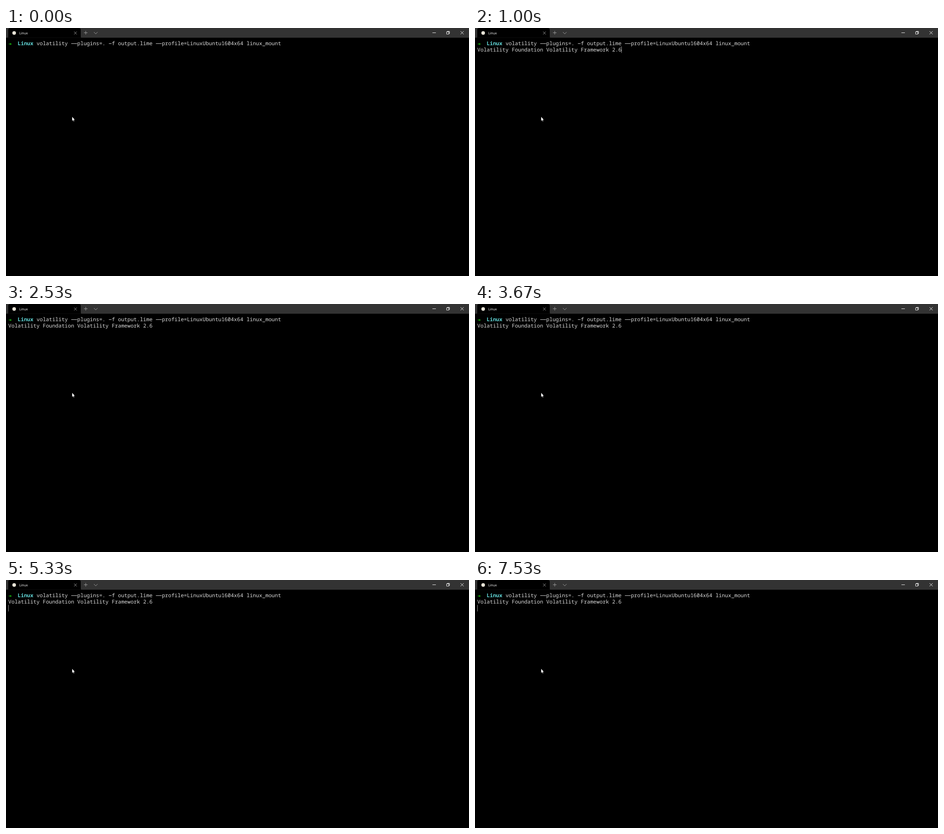
Write an HTML page that moves like this. It is 1022x548 px and loops after 8000 ms.

```html
<!DOCTYPE html>
<html lang="en">
<head>
<meta charset="utf-8">
<title>Terminal</title>
<style>
html, body { margin: 0; width: 100%; height: 100%; overflow: hidden; background: #000; }
svg { display: block; width: 1022px; height: 548px; }
text { text-rendering: geometricPrecision; white-space: pre; }
.term { font: 500 11.53px "Noto Sans Mono", "DejaVu Sans Mono", monospace; fill: #dadada; }
.term .dir { fill: #61d6d6; font-weight: 600; }
.rule { stroke: #cfcfcf; stroke-width: 1; }
.clear { fill: none; }
.tab { font: 500 7.6px "Open Sans", "Noto Sans", sans-serif; fill: #fff; }
.icon { fill: none; stroke: #fff; stroke-width: .9; }
.dim { stroke: #a8a8a8; }

#caret { fill: #989898; animation: move 8s step-end infinite, blink 8s step-end infinite; }
#output { animation: show 8s step-end infinite; }

@keyframes move {
  0% { transform: translate(607px, 26.4px); }
  10% { transform: translate(5px, 26.4px); }
  10.875% { transform: translate(5px, 40.75px); }
  12.5% { transform: translate(323px, 40.75px); }
  13.375%, 100% { transform: translate(5px, 55.1px); }
}
@keyframes blink {
  0%, 7.5%, 18.375%, 31.625%, 45.875%, 59.125%, 73.375%, 87.5% { opacity: 0; }
  .875%, 10%, 25%, 39.125%, 52.5%, 66.625%, 80%, 94.125%, 100% { opacity: 1; }
}
@keyframes show {
  0% { visibility: hidden; }
  12.5%, 100% { visibility: visible; }
}
</style>
</head>
<body>
<svg viewBox="0 0 1022 548">
  <rect width="1022" height="548"/>

  <!-- title bar -->
  <rect width="1022" height="21.5" fill="#333"/>
  <path d="M3 21.5Q5 21.5 5 19.5V4Q5 0 9 0H161Q165 0 165 4V19.5Q165 21.5 167 21.5Z"/>
  <circle cx="18" cy="11" r="4" fill="#e6e2d6"/>
  <text class="tab" x="29.2" y="13.8">Linux</text>
  <g class="icon">
    <path class="dim" d="M150.2 8l6.2 6.2m0-6.2l-6.2 6.2M172 10.5h8m-4-4v8M194 9l4.1 4 4.1-4"/>
    <path d="M941.3 10.5h7.6M972.5 8.5h5v5h-5zM974 8.5V7.3h5v5h-1.5M1003.3 7l7 7m0-7l-7 7"/>
  </g>

  <!-- prompt arrow -->
  <path d="M6 35.4H10.6" stroke="#16b50e" stroke-width="1.3"/>
  <path d="M9 32.8L12.6 35.4L9 38L9.7 35.4Z" fill="#16b50e"/>

  <g class="term">
    <g id="command"></g>
    <g id="output"></g>
  </g>
  <rect id="caret" width="1" height="14.3"/>

  <!-- mouse pointer -->
  <path d="M146 196V205.4L148.1 203.5L149.4 206.4L150.8 205.8L149.5 202.9H152Z"
        fill="#fff" stroke="#000" stroke-width=".3"/>
</svg>
<script>
const CELL = 6.92, LEFT = 5.1;
const RULES = { "-": -3.5, "_": 1.5 };  // heights relative to the baseline

function add(parent, tag, attrs, content = "") {
  const el = document.createElementNS(parent.namespaceURI, tag);
  for (const key in attrs) el.setAttribute(key, attrs[key]);
  el.textContent = content;
  parent.append(el);
  return el;
}

// Places words on the character grid; runs of dashes and underscores become joined rules.
function print(id, col, y, line, cls = "") {
  const group = document.getElementById(id);
  for (const { 0: word, index } of line.matchAll(/\S+/g)) {
    const left = LEFT + (col + index) * CELL;
    const text = add(group, "text", { x: left, y, class: cls });
    for (const { 0: part, index: at } of word.matchAll(/-+|_+|[^-_]+/g)) {
      const x = left + at * CELL, rule = RULES[part[0]];
      add(text, "tspan", { x, class: rule ? "clear" : "" }, part);
      if (rule) {
        add(group, "path", { class: "rule", d: `M${x + .5} ${y + rule}h${part.length * CELL - 1}` });
      }
    }
  }
}

print("command", 3, 38, "Linux", "dir");
print("command", 9, 38, "volatility --plugins=. -f output.lime --profile=LinuxUbuntu1604x64 linux_mount");
print("output", 0, 52.2, "Volatility Foundation Volatility Framework 2.6");
</script>
</body>
</html>
```
